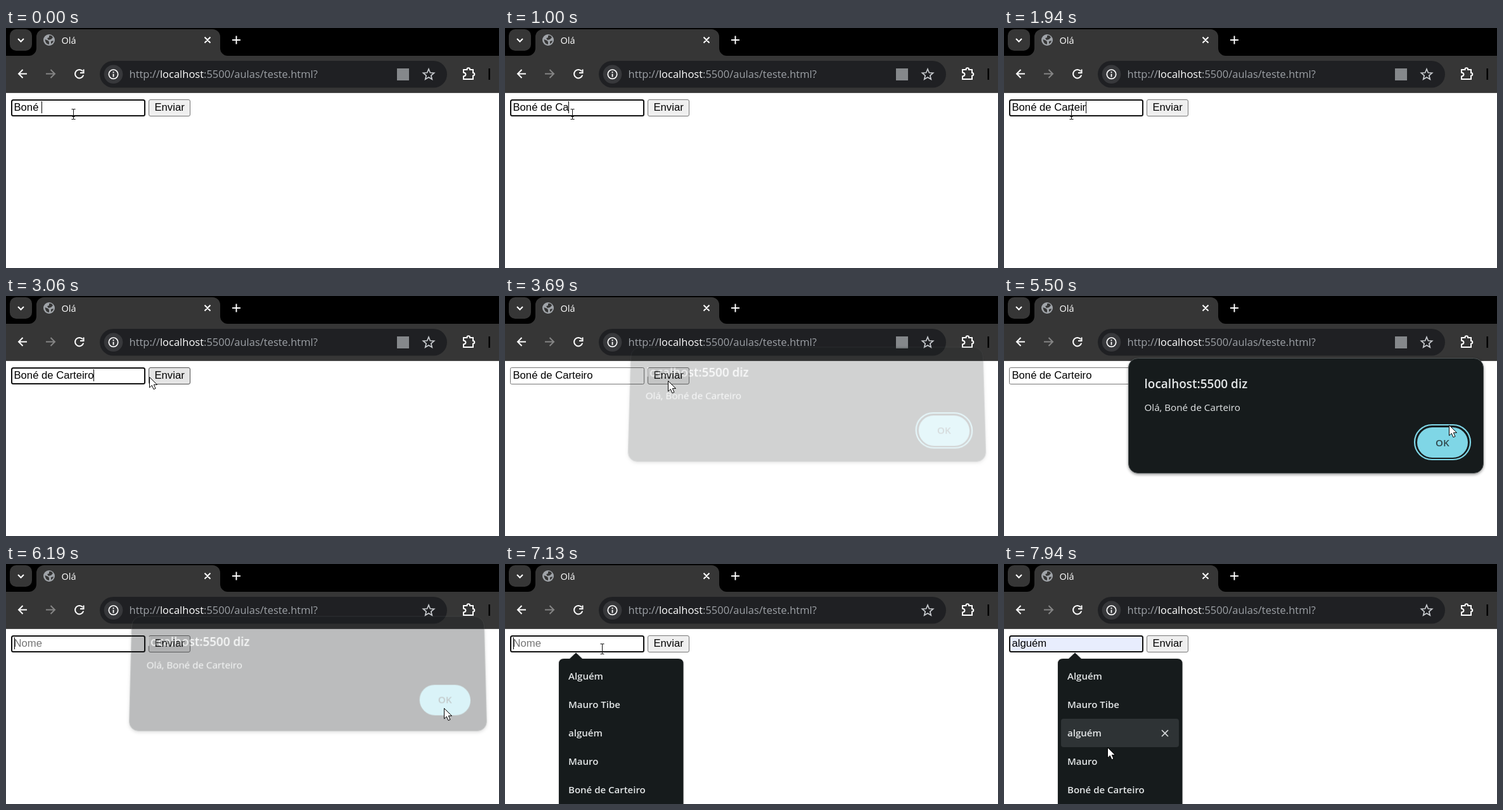
Write an HTML page that moves like this. It is 778 px wide and 380 px high and loops after 8000 ms.

```html
<!DOCTYPE html>
<html lang="pt-BR">
<head>
<meta charset="utf-8">
<title>Olá</title>
<style>
  html, body { margin: 0; width: 100%; height: 100%; overflow: hidden; background: #fff; }
  svg { position: absolute; left: 0; top: 0; overflow: visible; }
  text { white-space: pre; font-family: "Open Sans", "Noto Sans", sans-serif; }
  .form { font: 16.67px "Liberation Sans", Arial, sans-serif; }
  .icon { fill: none; stroke: #fff; stroke-width: 2; }
  .bold { font-weight: 600; fill: #e3e6e7; }
  #url { font-size: 16.5px; fill: #9da1a6; }
  #dialog { left: 196px; top: 98px; filter: drop-shadow(0 2px 2px #0006); }
</style>
</head>
<body>
<svg width="778" height="380">
  <!-- tab strip -->
  <path d="M0 0H778V44H0Z"/>
  <g fill="#363636">
    <rect x="6" y="2" width="35" height="34" rx="10"/>
    <path d="M36 44A12 12 0 0 0 48 32V14A12 12 0 0 1 60 2H326A12 12 0 0 1 338 14V32A12 12 0 0 0 350 44H778V103H0V44Z"/>
  </g>
  <path d="M0 102.500H778" stroke="#4d4d4d"/>
  <path class="icon" d="M19 17l4.500 4.500L28 17M313.500 14.500l9 9m0-9l-9 9M357 19h13M363.500 12.500v13"/>
  <circle cx="68" cy="19" r="9" fill="#a0a4a9"/>
  <path d="M61.500 18l5 2 1.500 2v4q-6-1-6.500-8ZM68 12q4-1 6 3l-3 3-4 1-2-3 3-1ZM71 21l4-1q-1 4-4 5Z" fill="#363636"/>
  <text x="87.500" y="24.500" font-size="14.500" fill="#fff">Olá</text>

  <!-- toolbar -->
  <path class="icon" d="M33 72.500H20m6.500-6.500L20 72.500l6.500 6.500"/>
  <path class="icon" style="stroke:#858585" d="M63 72.500H77m-6.500-6.500l6.500 6.500-6.500 6.500"/>
  <path class="icon" d="M121 68.500a6.700 6.700 0 1 0 1.200 6M122.500 65.500v5.500H117"/>
  <rect x="148" y="52" width="548" height="42.500" rx="21.250" fill="#1f2023"/>
  <circle cx="169.500" cy="73.200" r="14.800" fill="#37383b"/>
  <circle class="icon" cx="169.500" cy="73.200" r="7.200" style="stroke-width:1.700"/>
  <path class="icon" d="M169.500 72.500V77.500M169.500 69v2" style="stroke-width:1.800"/>
  <text id="url" x="194.500" y="79">http://<tspan fill="#fff">localhost</tspan>:5500/aulas/teste.html?</text>
  <rect id="translate" x="617" y="64" width="19" height="19" fill="#85888b"/>
  <path id="star" class="icon" style="stroke:#c9ccd0;stroke-width:1.700"/>
  <path class="icon" d="M722 66h5.500v-.500a2.300 2.300 0 0 1 4.600 0v.500H737v5a2.300 2.300 0 0 1 0 4.600V81H722v-4.500q3.500-.500 3.500-3t-3.500-3Z"/>
  <path d="M761.500 64h2.500v18h-2.500Z"/>

  <!-- form -->
  <rect id="field"/>
  <text id="value" class="form" x="12.500" y="131"/>
  <path id="caret" stroke="#000"/>
  <rect id="send" x="225.500" y="113.500" width="65" height="26" rx="2.500"/>
  <text class="form" x="234.500" y="131">Enviar</text>

  <!-- autofill list -->
  <g id="list">
    <path d="M102 150L112 140.500l10 9.500H273.500q8 0 8 8V390H85V158q0-8 8-8Z" fill="#161b1c" style="filter:drop-shadow(0 0 1px #0004)"/>
    <g id="hover">
      <rect x="90" y="155" width="186" height="45" rx="4" fill="#2e3335"/>
      <path class="icon" style="stroke:#d5d9da;stroke-width:1.700" d="M249 173l10 10m0-10l-10 10"/>
    </g>
    <g id="names" class="bold" font-size="15"></g>
  </g>
</svg>

<svg id="dialog" width="561" height="183">
  <rect x=".5" y=".5" width="560" height="182" rx="15" fill="#161b1c" stroke="#505657"/>
  <text class="bold" x="25.500" y="48" font-size="19">localhost:5500 diz</text>
  <text id="message" x="25.500" y="84" font-size="15.200" fill="#e3e6e7"/>
  <rect id="ring" x="452" y="106" width="88" height="55" rx="27.500" fill="none" stroke="#7fd6e6" stroke-width="2.200"/>
  <rect x="456" y="110" width="80" height="48" rx="24" fill="#7fd6e6"/>
  <text x="485" y="139.500" font-size="15.200" font-weight="600" fill="#31484d">OK</text>
</svg>

<svg width="778" height="380">
  <g id="pointer">
    <path id="arrow" d="M0 0V16.500L3.800 13l2.700 6.200 3-1.300-2.700-6H12Z" fill="#fff" stroke="#000"/>
    <path id="beam" d="M-3-8h2.500l.5.500.5-.5H3M0-8V8M-3 8h2.500L0 7.500l.5.500H3M-2 4H2" fill="none" stroke="#111"/>
  </g>
</svg>

<script>
const LOOP = 8000;
const FULL_NAME = 'Boné de Carteiro';
const NAMES = ['Alguém', 'Mauro Tibe', 'alguém', 'Mauro', FULL_NAME];
const KEY_INTERVAL = 185, TYPED_AT = 11 * KEY_INTERVAL;
const PRESS = 3560, OPEN = 3630, CLOSE = 6050, RELOAD = 6120, LIST_OPEN = 6920;

// time, x, y of the pointer's hot spot
const PATH = [
  [0, 106, 136], [2550, 106, 136], [3200, 242, 127], [3450, 257, 134],
  [4200, 257, 134], [4880, 520, 350], [5400, 702, 204], [5600, 702, 204],
  [5900, 691, 228], [6210, 691, 228], [6480, 455, 190], [6860, 153, 134],
  [7330, 153, 134], [7880, 163, 290], [LOOP, 163, 290]
];

const $ = id => document.getElementById(id);
const clamp = v => Math.max(0, Math.min(1, v));
const smooth = p => p * p * (3 - 2 * p);
const show = (id, on) => $(id).style.display = on ? '' : 'none';
const set = (id, attrs) => {
  for (const key in attrs) $(id).setAttribute(key, attrs[key]);
};

$('message').textContent = `Olá, ${FULL_NAME}`;
$('names').innerHTML = NAMES.map((name, i) =>
  `<text x="100" y="${183 + 45 * i}">${name}</text>`).join('');
set('star', { d: 'M' + Array.from({ length: 10 }, (_, i) => {
  const r = i % 2 ? 4 : 9, a = Math.PI * (i / 5 - .5);
  return [667 + r * Math.cos(a), 74 + r * Math.sin(a)];
}).join('L') + 'Z' });

function pointerAt(t) {
  const i = PATH.findIndex(key => key[0] > t);
  const [t0, x0, y0] = PATH[i - 1], [t1, x1, y1] = PATH[i];
  const p = smooth((t - t0) / (t1 - t0));
  return [x0 + (x1 - x0) * p, y0 + (y1 - y0) * p];
}

function drawField(t, preview) {
  const reloaded = t >= RELOAD;
  const focused = t < PRESS || reloaded;
  const typed = FULL_NAME.slice(0, 5 + Math.floor(t / KEY_INTERVAL));
  const value = reloaded ? preview : typed;
  set('field', focused
    ? { x: 9, y: 114, width: 210, height: 25, rx: 2.5, stroke: '#101010', 'stroke-width': 2 }
    : { x: 8.5, y: 113.5, width: 211, height: 26, rx: 2, stroke: '#767676', 'stroke-width': 1 });
  set('field', { fill: preview ? '#e8edfd' : '#fff' });
  $('value').textContent = value || 'Nome';
  set('value', { fill: value ? '#000' : '#757575' });

  const blinkStart = t >= LIST_OPEN ? LIST_OPEN : reloaded ? RELOAD : TYPED_AT;
  const lit = t < blinkStart || (t - blinkStart) % 1000 < 500;
  const x = value ? Math.round(12 + $('value').getComputedTextLength()) + .5 : 13.5;
  set('caret', { d: `M${x} 116V135` });
  show('caret', focused && lit && !preview);
}

function drawDialog(t) {
  const shown = t < CLOSE ? clamp((t - OPEN) / 300) : 1 - clamp((t - CLOSE) / 200);
  const lift = 1 - smooth(shown);
  const style = $('dialog').style;
  style.opacity = shown;
  style.transform = `translateY(${-21 * lift}px) perspective(900px) rotateX(${6 * lift}deg)`;
  show('ring', t < CLOSE);
}

function draw(t) {
  const [x, y] = pointerAt(t);
  const listOpen = t >= LIST_OPEN;
  const row = listOpen && y >= 156 ? Math.floor((y - 156) / 45) : -1;
  show('list', listOpen);
  show('hover', row >= 0);
  set('hover', { transform: `translate(0 ${45 * row})` });
  show('translate', t < RELOAD);

  drawField(t, row >= 0 ? NAMES[row] : '');
  const overSend = x > 225 && x < 291 && y > 113 && y < 140 && (t < OPEN || t > RELOAD);
  set('send', { fill: overSend ? '#e5e5e5' : '#efefef', stroke: overSend ? '#4f4f4f' : '#767676' });
  drawDialog(t);

  const overField = x > 8 && x < 220 && y > 113 && y < 140;
  show('beam', overField);
  show('arrow', !overField);
  set('pointer', { transform: `translate(${Math.round(x) + .5} ${Math.round(y) + .5})` });
}

const start = performance.now();
function tick() {
  draw((performance.now() - start) % LOOP);
  requestAnimationFrame(tick);
}
tick();
</script>
</body>
</html>
```
